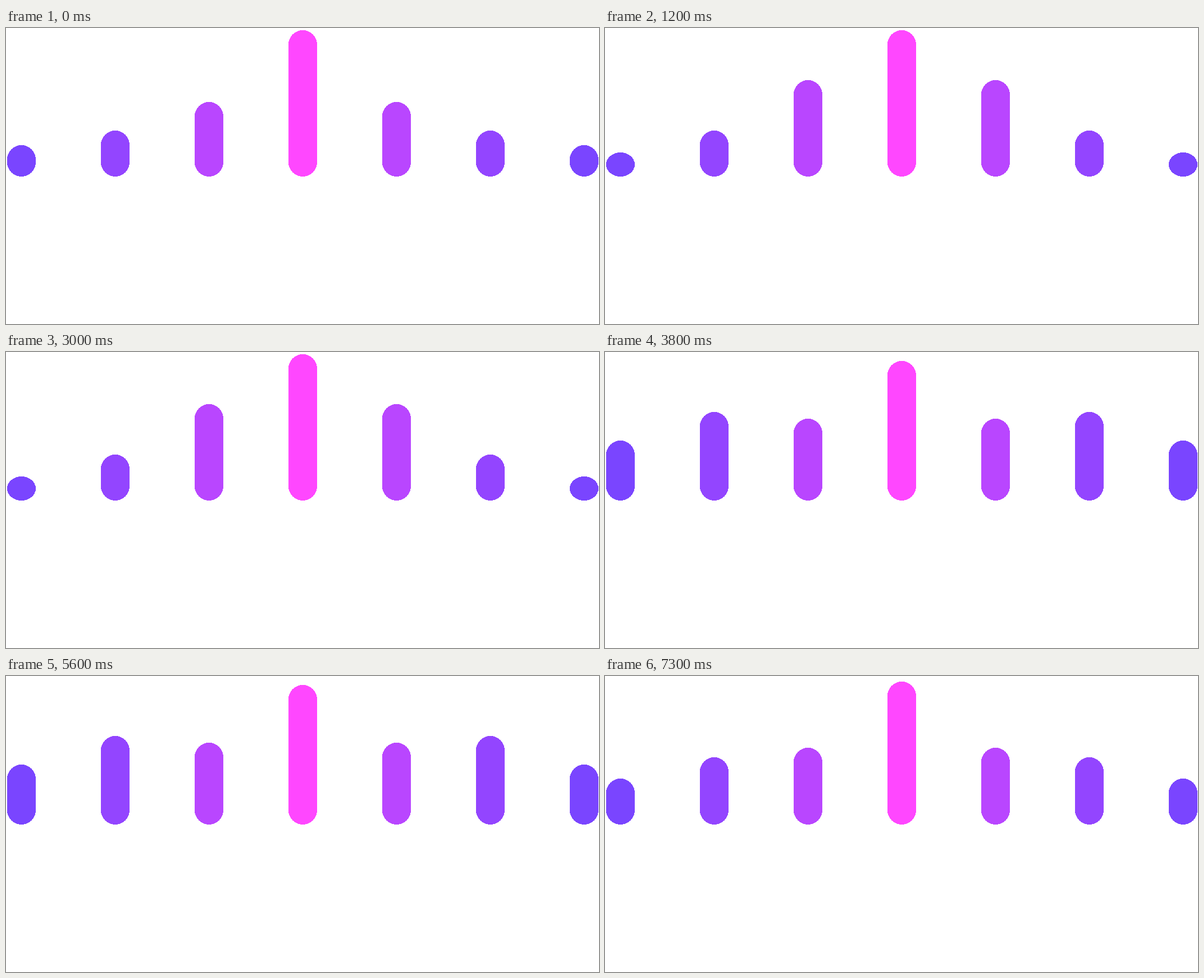
An HTML page that plays this animation: 1056 by 528 pixels, repeating every 7.4 s.

```html
<!DOCTYPE html>
<html lang="en">
<head>
<meta charset="utf-8">
<title>Equalizer bars</title>
<style>
  html, body { margin: 0; width: 100%; height: 100%; overflow: hidden; background: #fff; }
  svg { display: block; width: 100vw; height: 100vh; }
</style>
</head>
<body>
<svg id="stage" viewBox="0 0 1056 528" shape-rendering="crispEdges"></svg>
<script>
const LOOP = 7400, STEP = 100, CYCLE = 1800, BEAT = 200;
const BASE = 265, WIDTH = 51, GAP = 167, LEFT = 2, COUNT = 7;

// Bounces between two heights, one beat each way.
const swing = (from, to) => phase => {
  const beat = phase / BEAT % 2;
  return from + (to - from) * (1 - Math.abs(1 - beat));
};

// Moves through [time, top] points; power > 1 eases each move in.
const path = (points, power = 1) => phase => {
  const next = points.findIndex(([time], i) => i > 0 && time >= phase);
  const [t0, y0] = points[next - 1], [t1, y1] = points[next];
  return y0 + (y1 - y0) * ((phase - t0) / (t1 - t0)) ** power;
};

// Outermost pair first; topAt gives the upper edge of the bar.
const pairs = [
  { color: '#7a45ff', topAt: path([[0, 209], [200, 158], [600, 165], [1000, 215], [1200, 222], [1400, 171], [CYCLE, 158]]) },
  { color: '#9345ff', topAt: swing(183, 107) },
  { color: '#b946ff', topAt: path([[0, 132], [200, 119], [1200, 93], [CYCLE, 124]], 1.75) },
  { color: '#ff47ff', topAt: swing(4, 16) }
];

const stage = document.getElementById('stage');
const bars = Array.from({ length: COUNT }, (_, i) => {
  const { color, topAt } = pairs[Math.min(i, COUNT - 1 - i)];
  const rect = document.createElementNS('http://www.w3.org/2000/svg', 'rect');
  const attrs = { x: LEFT + i * GAP, width: WIDTH, rx: WIDTH / 2, fill: color };
  for (const name in attrs) rect.setAttribute(name, attrs[name]);
  stage.append(rect);
  return { rect, topAt };
});

function draw(time) {
  const t = Math.floor((time % LOOP) / STEP) * STEP;
  // A finished cycle shows its end pose before restarting.
  const phase = t === 0 ? 0 : (t % CYCLE || CYCLE);
  for (const { rect, topAt } of bars) {
    const top = Math.floor(topAt(phase));
    const height = BASE - top;
    rect.setAttribute('y', top);
    rect.setAttribute('height', height);
    rect.setAttribute('ry', Math.min(WIDTH, height) / 2);
  }
}

const start = performance.now();
function tick() {
  draw(performance.now() - start);
  requestAnimationFrame(tick);
}
draw(0);
requestAnimationFrame(tick);
</script>
</body>
</html>
```
